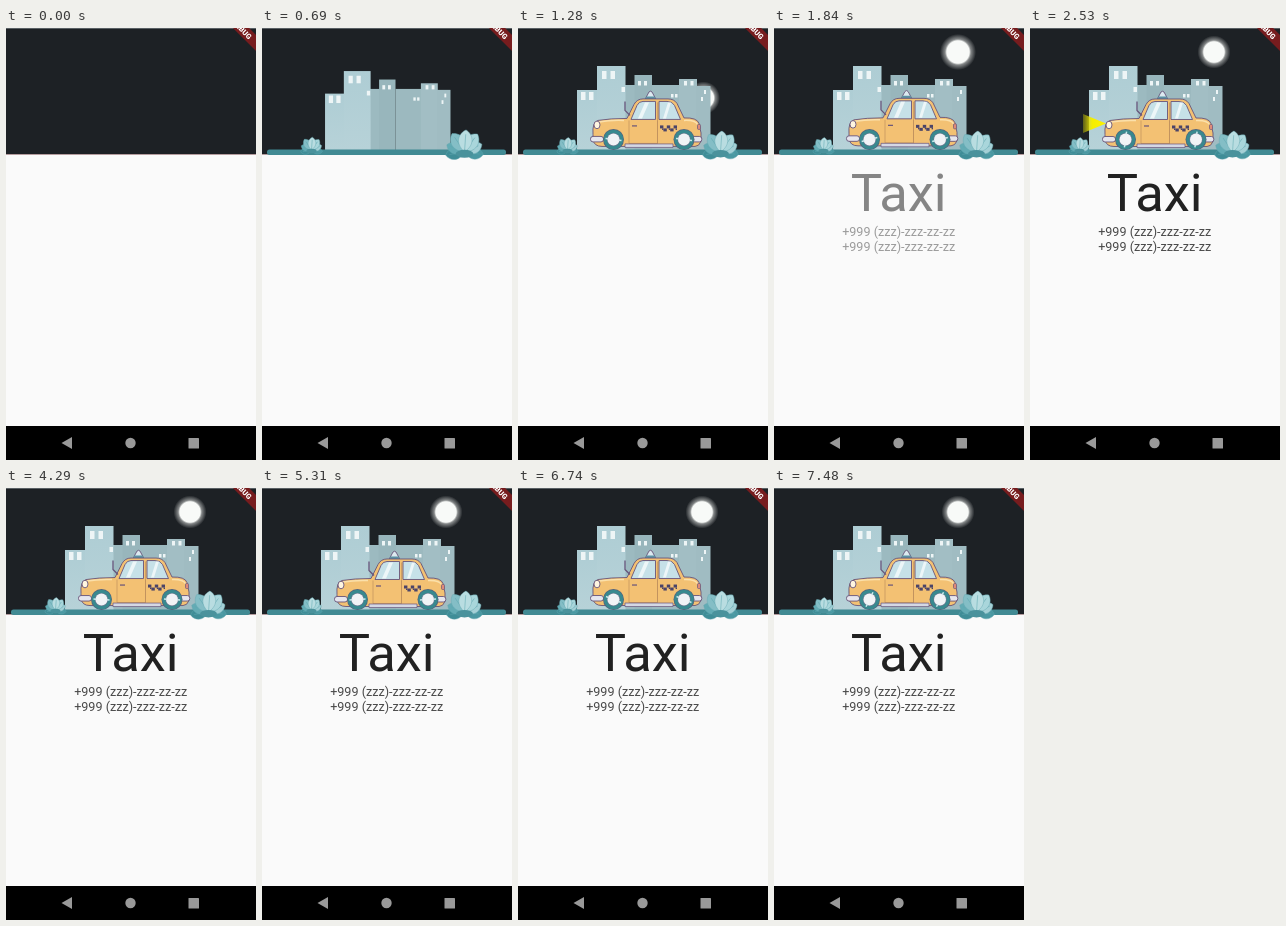
Write an HTML page that moves like this. It is 250 px wide and 432 px high and loops after 7.53 s.

```html
<!DOCTYPE html>
<html lang="en">
<head>
<meta charset="utf-8">
<title>Taxi</title>
<style>
  html, body { margin: 0; width: 100%; height: 100%; overflow: hidden; background: #fafafa; }
  svg { display: block; width: 250px; height: 432px; }
  text { font-family: Roboto, sans-serif; }
</style>
</head>
<body>
<svg viewBox="0 0 250 432">
  <defs>
    <radialGradient id="glow">
      <stop offset=".62" stop-color="#f8faf8"/>
      <stop offset=".72" stop-color="#e8eae8" stop-opacity=".5"/>
      <stop offset="1" stop-color="#e8eae8" stop-opacity="0"/>
    </radialGradient>
    <linearGradient id="ray">
      <stop offset="0" stop-color="#d8d400" stop-opacity=".35"/>
      <stop offset=".4" stop-color="#f4ee00"/>
      <stop offset="1" stop-color="#fff200"/>
    </linearGradient>
    <linearGradient id="wall" x2="0" y2="1">
      <stop offset="0" stop-color="#aecdd4"/>
      <stop offset="1" stop-color="#b7d2d8"/>
    </linearGradient>
    <clipPath id="sky"><rect width="250" height="126"/></clipPath>
    <g id="wheel">
      <circle r="10.5" fill="#55607a"/>
      <circle r="9.8" fill="#38898f"/>
      <circle r="6.6" fill="#6d7890"/>
      <circle r="6" fill="#f1f3f6"/>
    </g>
  </defs>

  <rect width="250" height="432" fill="#fafafa"/>
  <rect width="250" height="126" fill="#1d2125"/>
  <rect width="250" height="1" fill="#596064"/>
  <rect y="126" width="250" height=".8" fill="#80585b" opacity=".7"/>

  <g clip-path="url(#sky)"><circle id="moon" r="16.5" fill="url(#glow)"/></g>
  <g id="city"></g>
  <rect id="ground" x="5" y="121.5" width="239" height="5.5" rx="2.5" fill="#418a93"/>
  <g id="bushL"></g>

  <g id="car">
    <path id="beam" d="M76 95.500L53 86V105Z" fill="url(#ray)"/>
    <g id="body" stroke="#67547a" stroke-width=".9" stroke-linejoin="round">
      <path d="M127 71L131 63.500Q132.500 62 134 63.500L138 71Z" fill="#dceaf0"/>
      <path d="M128.500 68H136.500L138 71H127Z" fill="#5b91a3" stroke="none"/>
      <path d="M75 106Q74 94 80 92Q92 90 109 90L116 76Q119 70.500 125 70.500H150Q156 70.500 159 75L166 89.500Q179 89 181 95Q184 105 183 113Q181 118 177 118H84Q76 118 75 111Z" fill="#f3c173"/>
      <path d="M113 91L119 77Q121 73 125 73H137.500V91Z" fill="#c6e1e8"/>
      <path d="M141 91V73H149Q154.500 73 156.500 77L162.500 91Z" fill="#c6e1e8"/>
      <path d="M120 90L127 74H131L124 90ZM145 90L150 74H153L148 90Z" fill="#edf6f8" stroke="none"/>
      <path d="M107 73V82L112 87" fill="none" stroke-width="1.300"/>
      <path d="M111 92V115H139.500V74M139.500 92V115" fill="none" stroke="#b98a5c" stroke-width=".6"/>
      <path d="M81 93.500Q92 91.500 106 92M166 92Q177 91.500 179.500 96" fill="none" stroke="#fbe0aa" stroke-width="1.500"/>
      <path d="M107 115.500H155V119H107Z" fill="#d5d8e4" stroke-width=".7"/>
      <path d="M114 97.500H119" stroke-width="1.200"/>
      <ellipse cx="79" cy="96.500" rx="3" ry="3.800" fill="#fff5df"/>
      <rect x="72.500" y="108" width="13" height="5.500" rx="2.500" fill="#e6e6ee"/>
      <rect x="173" y="108" width="10.800" height="5.500" rx="2.500" fill="#e6e6ee"/>
      <rect x="179.500" y="96" width="3" height="5" rx="1" fill="#df8a78" stroke-width=".7"/>
      <g id="checks" stroke="none"></g>
    </g>
    <use href="#wheel" x="95.500" y="111.500"/>
    <use href="#wheel" x="166" y="111.500"/>
    <path class="shine" data-x="95.5" d="M88.500 107.500L91 109M100 114L102.500 115.500" stroke="#cde9ec" stroke-width="1.500"/>
    <path class="shine" data-x="166" d="M159 107.500L161.500 109M170.500 114L173 115.500" stroke="#cde9ec" stroke-width="1.500"/>
  </g>
  <g id="bushR"></g>

  <g id="words" text-anchor="middle" fill="#212121">
    <text x="124.700" y="182.500" font-size="52.500">Taxi</text>
    <g font-size="12.600" fill="#4a4a4a">
      <text x="124.700" y="208">+999 (zzz)-zzz-zz-zz</text>
      <text x="124.700" y="222.500">+999 (zzz)-zzz-zz-zz</text>
    </g>
  </g>

  <g transform="translate(239 4) rotate(45)">
    <rect x="-30" y="-5.700" width="60" height="11.400" fill="#771c1e"/>
    <text x="8" y="2.900" text-anchor="end" font-size="7.400" font-weight="900" fill="#fff">DEBUG</text>
  </g>

  <rect y="398" width="250" height="34" fill="#000"/>
  <g fill="#999">
    <path d="M55.500 415L66 409V421Z"/>
    <circle cx="124.500" cy="415" r="5.200"/>
    <rect x="182.500" y="410" width="10.500" height="10.500" rx=".6"/>
  </g>
</svg>
<script>
const LOOP = 7530;
const $ = id => document.getElementById(id);
const clamp = v => Math.max(0, Math.min(1, v));
const span = (t, a, b) => clamp((t - a) / (b - a));
const smooth = p => p * p * (3 - 2 * p);
const backOut = p => 1 + 2.2 * (p - 1) ** 3 + 1.2 * (p - 1) ** 2;
const rect = (x, y, w, h, fill) =>
  `<rect x="${x}" y="${y}" width="${w}" height="${h}" fill="${fill}"/>`;

// x, top, width, colour
const towers = [
  [103, 57, 16, '#9cbac0'], [116.5, 47, 17.5, '#98b6bc'], [134, 57, 28, '#9cb9bf'],
  [161, 51, 18, '#a2bec4'], [178, 58, 14.5, '#a0bcc2'],
  [59, 62, 21, 'url(#wall)'], [79, 38, 28.5, 'url(#wall)']
];
// x, y, width, height
const panes = [
  [63, 64, 4.5, 8], [71, 64, 4.5, 8], [84, 43, 4.5, 8], [92.5, 43, 4.5, 8],
  [103.5, 59, 3.5, 5], [120, 53, 3, 4.5], [126, 53, 3, 4.5],
  [166, 53, 3, 4.5], [172.5, 53, 3, 4.5], [153, 66, 2.5, 3.5],
  [157, 66, 2.5, 3.5], [186, 62, 2, 4], [183, 69, 2, 4]
];
$('city').innerHTML = towers.map(([x, y, w, c]) => rect(x, y, w, 122 - y, c)).join('') +
  panes.map(p => rect(...p, '#eef5f6')).join('');

$('checks').innerHTML = [0, 1, 2, 3, 4]
  .map(i => rect(142 + i * 3.4, 97 + i % 2 * 3, 3.4, 3, '#4b4468') +
    (i % 2 ? '' : rect(144 + i * 3.4, 100, 1.4, 1.5, '#4b4468'))).join('');

function bush(id, x, y, size) {
  const leaves = [-100, 98, -68, 66, -34, 36, 4];
  const tones = ['#3f8d97', '#4a98a2', '#63abb4', '#a4d0d6', '#84bec6', '#a9d6db', '#b9dde1'];
  $(id).innerHTML = leaves.map((a, i) => {
    const len = size * (Math.abs(a) > 60 ? .86 : 1);
    return `<g transform="translate(${x} ${y}) rotate(${a})">
      <path d="M0 0C${-len * .5} ${-len * .4} ${-len * .3} ${-len * .85} 0 ${-len}C${len * .3} ${-len * .85} ${len * .5} ${-len * .4} 0 0Z"
        fill="${tones[i]}" stroke="#64a8b1" stroke-width=".4"/>
      <path d="M0 0V${-len * .8}" stroke="#5fa7b0" stroke-width=".5"/></g>`;
  }).join('') +
    `<ellipse cx="${x}" cy="${y + size * .08}" rx="${size * .4}" ry="${size * .18}" fill="#4a929c"/>`;
}
bush('bushL', 49.5, 122, 12.5);
bush('bushR', 202.5, 124, 21);

function pop(id, x, y, p) {
  const s = p > 0 ? backOut(p) : 0;
  $(id).setAttribute('transform', `translate(${x} ${y}) scale(${s}) translate(${-x} ${-y})`);
  $(id).setAttribute('opacity', clamp(p * 3));
}

const flashes = [[2300, 2850], [4450, 5000], [5750, 6250]];
const shines = document.querySelectorAll('.shine');

function draw(t) {
  $('ground').setAttribute('opacity', t < 30 ? 0 : 1);
  pop('bushL', 49.5, 123, span(t, 180, 800));
  pop('bushR', 202.5, 125, span(t, 260, 930));
  pop('city', 126, 122, span(t, 450, 1080));
  pop('car', 128, 122, span(t, 700, 1220));

  const arc = Math.PI * (.5 - smooth(span(t, 1240, 1730)));
  const pulse = 1 + .16 * Math.sin(Math.PI * span(t, 1700, 2400));
  $('moon').setAttribute('transform',
    `translate(${184 + 23 * Math.cos(arc)} ${47 + 23 * Math.sin(arc)}) scale(${pulse})`);
  $('moon').setAttribute('opacity', span(t, 1100, 1220));

  $('words').setAttribute('opacity', smooth(span(t, 1450, 2200)));

  const bob = t < 1220 ? 0 : .5 * Math.sin((t - 1220) / 400 * 2 * Math.PI);
  $('body').setAttribute('transform', `translate(0 ${bob})`);
  shines.forEach(s => s.setAttribute('transform',
    `rotate(${t < 1220 ? 0 : -(t - 1220) * .36} ${s.dataset.x} 111.5)`));
  const light = flashes.map(([a, b]) => Math.min(span(t, a, a + 120), 1 - span(t, b - 120, b)));
  $('beam').setAttribute('opacity', Math.max(...light));
}

const start = performance.now();
function tick() {
  draw((performance.now() - start) % LOOP);
  requestAnimationFrame(tick);
}
tick();
</script>
</body>
</html>
```
